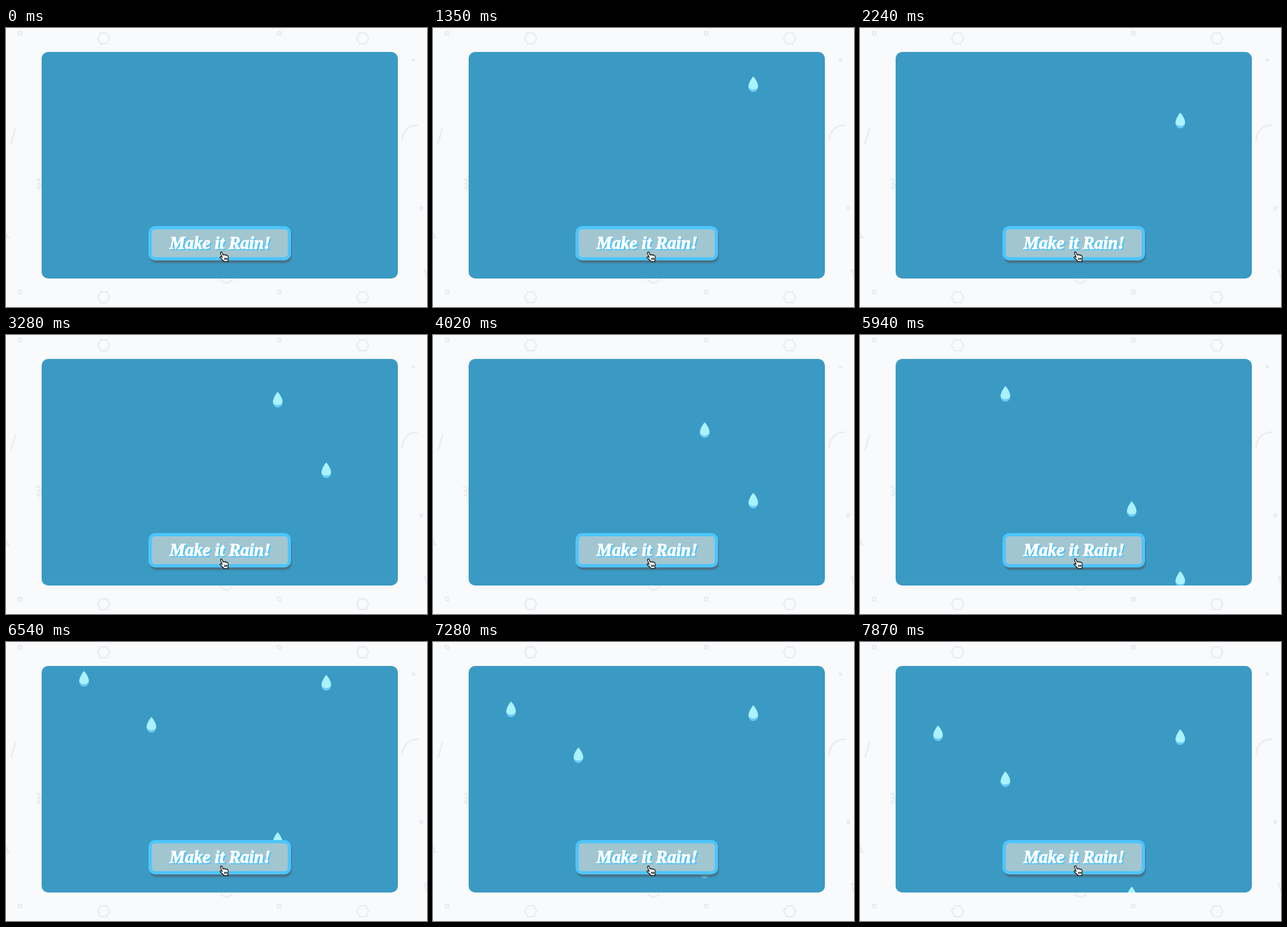
An HTML page for the animation above (8000 ms loop, 650 by 431 pixels).

```html
<!DOCTYPE html>
<html lang="en">
<head>
<meta charset="utf-8">
<title>Make it Rain!</title>
<style>
  html, body { margin: 0; width: 100%; height: 100%; overflow: hidden; background: #f9fafc; }
  svg { display: block; width: 650px; height: 431px; }
  .doodles { fill: none; stroke: #ebecef; stroke-width: 2.5; }
  .doodles .solid { fill: #ebecef; stroke: none; }
  .label { font: italic bold 27px "Liberation Serif", serif; text-anchor: middle; stroke-width: .9; stroke-linejoin: round; }
</style>
</head>
<body>
<svg viewBox="0 0 650 431">
  <defs>
    <g id="tile">
      <path d="M141.5 16L146 7.7H155.5L160 16L155.5 24.3H146Z"/>
      <circle class="solid" cx="22" cy="8" r="2.7"/>
    </g>
    <g id="drop">
      <path fill="#6acaf2" d="M7.5 0C10.5 3.2 15 10.5 15 16.5A7.5 7.5 0 0 1 0 16.5C0 10.5 4.5 3.2 7.5 0Z"/>
      <path fill="#aaf2fe" d="M7.5 0C10.5 3.2 14.8 10 14.8 14.6C14.6 18.4 11.6 20.3 8 20.3C4.2 20.3 .8 18.6 .2 15.5C.2 10.2 4.5 3.2 7.5 0Z"/>
    </g>
    <clipPath id="cardShape"><rect x="55" y="37" width="550" height="350" rx="10"/></clipPath>
    <filter id="soft" x="-5%" y="-15%" width="110%" height="135%"><feGaussianBlur stdDeviation="1"/></filter>
  </defs>

  <rect width="650" height="431" fill="#f9fafc"/>
  <g class="doodles">
    <use href="#tile"/>
    <use href="#tile" x="400"/>
    <use href="#tile" y="400"/>
    <use href="#tile" x="400" y="400"/>
    <circle class="solid" cx="629" cy="49.5" r="2.7"/>
    <rect class="solid" x="638.5" y="275.5" width="5.5" height="6" rx="1"/>
    <path d="M15 154L7.5 179M611.5 174C612 160 622 150 636 150"/>
    <path d="M46.5 235C50 232.5 54 235 52.5 238.5L48.5 241.5C53 240 55 243 52.5 245.5L48.5 246.5L53 250"/>
    <path d="M-2 313L4 324H-2M652 374H646L652 390"/>
    <circle cx="340.5" cy="384.5" r="9.5"/>
  </g>

  <rect x="55" y="37" width="550" height="350" rx="10" fill="#3a9ac4"/>
  <g id="rain" clip-path="url(#cardShape)"></g>

  <g id="button">
    <rect id="softShadow" x="222" y="311" width="219" height="52" rx="10" fill="#4b6b7b" opacity=".85" filter="url(#soft)"/>
    <rect id="hardShadow" x="220" y="309" width="220" height="53" rx="10" fill="#46545c"/>
    <rect x="220" y="306" width="220" height="53" rx="10" fill="#4dc5fb"/>
    <rect x="225" y="311" width="210" height="43" rx="5" fill="#a2c6d0"/>
    <text class="label" x="332.5" y="343" fill="#4dc5fb" stroke="#4dc5fb" aria-hidden="true">Make it Rain!</text>
    <text class="label" x="330.5" y="340.5" fill="#fff" stroke="#fff">Make it Rain!</text>
  </g>

  <path transform="translate(329 345)" fill="#fff" stroke="#000" stroke-width="1.1" stroke-linejoin="round"
    d="M4.8 9.6L2.2 2.8C1.7 1.2 3.8 .2 4.6 1.7L6.5 5.9C6.9 4.7 8.6 4.8 9 6C9.5 5 11 5.2 11.3 6.4C12 5.6 13.2 6 13.5 7C14.5 9 14.8 11 13.9 12.9L13.5 15.8H7.6C6.4 13.6 3.8 12 1.8 10.2C.8 9 2 7.9 3.2 8.5ZM8.5 10V13.3M10.5 10V13.3M12.3 10V13"/>
</svg>

<script>
  const LOOP = 8000, START = 1044, STEP = 148.3, FALL = 9.375;

  // x, first step on screen, top at that step
  const drops = [
    [487, 0, 56],
    [412, 10, 40.9],
    [217, 29, 41],
    [487, 36, 41.6],
    [113, 37, 45]
  ];
  const pressedSteps = [9, 18, 28, 35];

  const byId = id => document.getElementById(id);
  const nodes = drops.map(() => {
    const node = document.createElementNS("http://www.w3.org/2000/svg", "use");
    node.setAttribute("href", "#drop");
    byId("rain").append(node);
    return node;
  });
  const show = (node, on) => node.setAttribute("visibility", on ? "visible" : "hidden");

  function draw(time) {
    const step = Math.floor((time % LOOP - START) / STEP);
    drops.forEach(([x, first, top], i) => {
      const y = Math.round(top + (step - first) * FALL);
      show(nodes[i], step >= first && y < 387);
      nodes[i].setAttribute("transform", `translate(${x} ${y})`);
    });
    const pressed = pressedSteps.includes(step);
    byId("button").setAttribute("transform", `translate(0 ${pressed ? 3 : 0})`);
    show(byId("softShadow"), !pressed);
    show(byId("hardShadow"), pressed);
  }

  const origin = performance.now();
  function tick() {
    draw(performance.now() - origin);
    requestAnimationFrame(tick);
  }
  tick();
</script>
</body>
</html>
```
